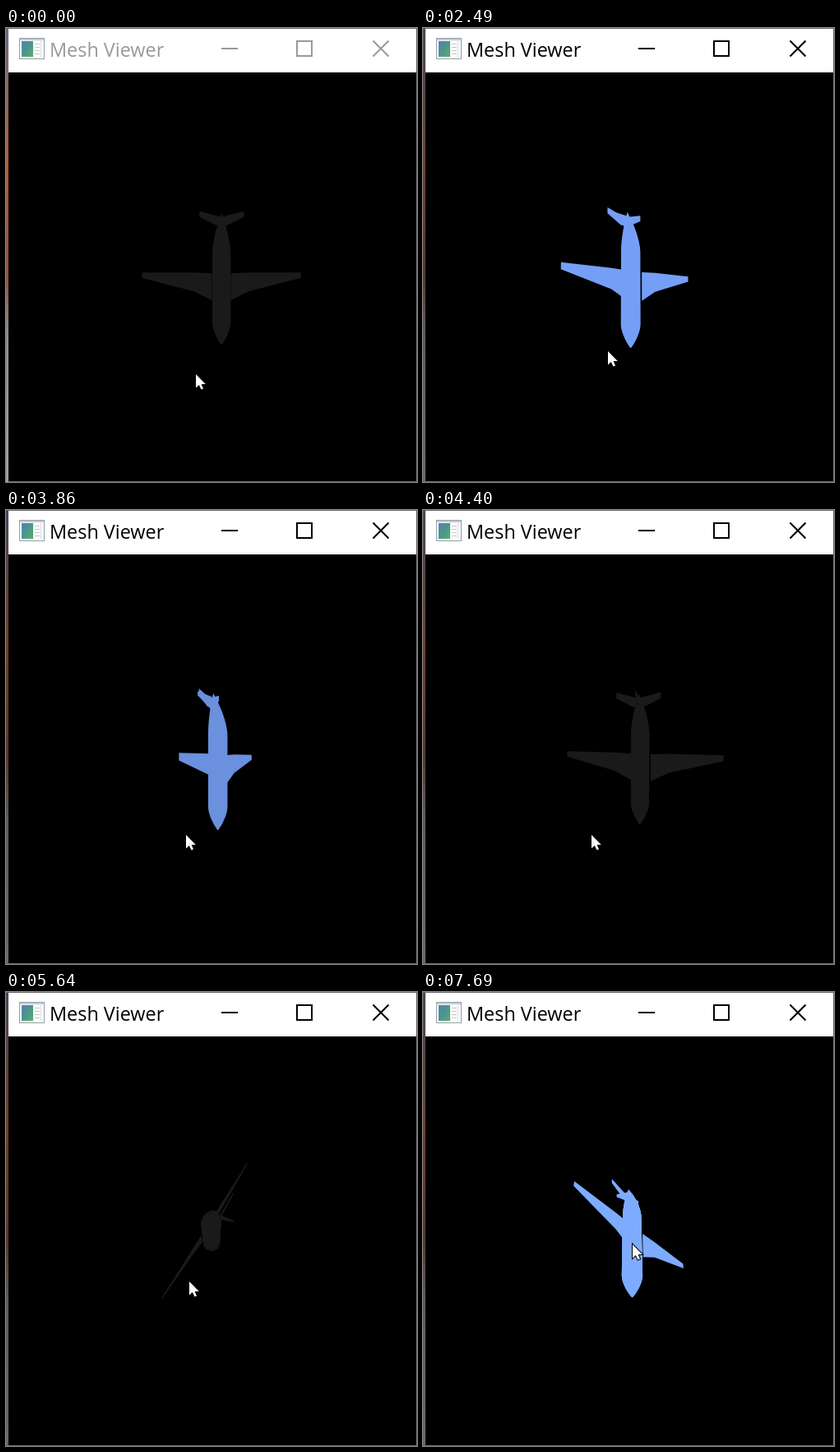
These frames come from a looping animation (500x552 px, 8000 ms). An HTML page with a canvas:

```html
<!DOCTYPE html>
<html lang="en">
<head>
<meta charset="utf-8">
<title>Mesh Viewer</title>
<style>
  html, body { margin: 0; width: 100%; height: 100%; overflow: hidden; background: #000; }
  svg, canvas { position: absolute; left: 0; top: 0; width: 500px; height: 552px; display: block; }
  .title { font: 23.4px "Open Sans", "Noto Sans", sans-serif; fill: #999; }
  .buttons { fill: none; stroke: #999; stroke-width: 2; }
  .shade { fill: #000; opacity: 0; }
  .active .title { fill: #000; }
  .active .buttons { stroke: #000; }
  .active .shade { opacity: .35; }
</style>
</head>
<body>
<svg id="win" viewBox="0 0 500 552">
  <defs>
    <linearGradient id="desk" x1="0" y1="0" x2="0" y2="1">
      <stop offset="0" stop-color="#6c6c84"/>
      <stop offset=".3" stop-color="#a8603c"/>
      <stop offset=".55" stop-color="#8a5440"/>
      <stop offset=".68" stop-color="#8c8c8c"/>
      <stop offset="1" stop-color="#a0a0a0"/>
    </linearGradient>
    <linearGradient id="pic" x1="0" y1="0" x2="1" y2="1">
      <stop offset="0" stop-color="#5580ae"/>
      <stop offset=".5" stop-color="#4a978c"/>
      <stop offset="1" stop-color="#5cae68"/>
    </linearGradient>
  </defs>
  <rect width="3" height="552" fill="url(#desk)"/>
  <rect class="shade" width="3" height="552"/>
  <rect x="3" y="1" width="496" height="53" fill="#fff"/>
  <path d="M0 .5H500M499.5 0V552M2 551.5H500" stroke="#6a6a6a"/>
  <g>
    <rect x="16.5" y="12.5" width="30" height="25" fill="#f4f6f8" stroke="#98a0a8"/>
    <rect x="17" y="13" width="29" height="2" fill="#c4ccd6"/>
    <rect x="19" y="16" width="14" height="19" fill="url(#pic)"/>
    <rect x="34" y="16" width="11" height="19" fill="#fdfdfd"/>
    <path d="M35 19.5H41M35 23.5H41M35 27.5H41M35 31.5H41" stroke="#c6c8cc"/>
    <path d="M42.5 16V35" stroke="#dcdee0"/>
  </g>
  <text class="title" x="53" y="35">Mesh Viewer</text>
  <path class="buttons" d="M262 25H282M354 16H372V34H354ZM446.5 15.5L465.5 34.5M465.5 15.5L446.5 34.5"/>
</svg>
<canvas id="view" width="500" height="552"></canvas>
<script>
const LOOP = 8000, CX = 253, CY = 302.5, DEPTH = 450;
const win = document.getElementById('win');
const ctx = document.getElementById('view').getContext('2d');

// Each drag runs in even steps: first step, last step, steps, then yaw, pitch, cursor x and y at its end
const rest = [0, 0, 231, 421];
const drags = [
  [150, 640, 4, 0, 0, 226, 416],
  [920, 1280, 4, 0, 0, 202, 396],
  [1560, 2490, 8, 137, 6, 225, 393],
  [2770, 3010, 3, 194, 4, 231, 393],
  [3320, 3860, 5, 115.5, 0, 219, 395],
  [4005, 4280, 3, 57, -4, 211, 395],
  [4400, 4400, 1, 14, -7, 205, 395],
  [4680, 4680, 1, -42, -16, 206, 391],
  [4815, 5640, 7, -59, -75, 223, 352],
  [5790, 6570, 7, -165, 0, 237, 325],
  [6690, 6840, 2, -228, 16, 242, 320],
  [7120, 7405, 3, -230, 46, 250, 311],
  [7545, 7690, 2, -230, 37, 255, 307]
];

const wing = [[12, -4.5], [35, -5.5], [100, -5.5], [100, 1.5], [35, 18], [12, 29.5]];
const stab = [[0, -72.5], [27, -79.5], [27, -72.5], [6, -62], [0, -62]];
const fin = [[-82, 27], [-77, 27], [-58, 8], [-74, 8]];

const light = [-.64, .6, -.705];
const tint = [91, 134, 222];
const rad = deg => deg * Math.PI / 180;
const mix = (p, q, k) => p.map((v, i) => v + (q[i] - v) * k);

function poseAt(t) {
  let pose = rest;
  for (const [from, to, steps, ...end] of drags) {
    if (t < from) break;
    const gap = (to - from) / (steps - 1) || 1;
    const done = Math.min(steps, Math.floor((t - from) / gap + .01) + 1);
    pose = mix(pose, end, done / steps);
  }
  return pose;
}

function turn([x, y, z], yaw, pitch) {
  const c = Math.cos(yaw), s = Math.sin(yaw), cp = Math.cos(pitch), sp = Math.sin(pitch);
  const depth = x * s + z * c;
  return [x * c - z * s, y * cp - depth * sp, depth * cp + y * sp];
}

function fillPoly(points) {
  ctx.beginPath();
  points.forEach(p => ctx.lineTo(p[0], p[1]));
  ctx.closePath();
  ctx.fill();
}

function drawPlane(yaw, pitch) {
  const project = (x, y, z) => {
    const [px, py, pz] = turn([x + 9.3, y, z - 9.5], yaw, pitch);
    const k = DEPTH / (DEPTH - pz);
    return [CX + px * k, CY + py * k, k];
  };
  const n = turn([0, 0, 1], yaw, pitch);
  const lit = Math.max(0, n.reduce((sum, v, i) => sum + v * light[i], 0));
  ctx.fillStyle = `rgb(${tint.map(v => Math.min(255, Math.round(26 + v * lit))).join()})`;

  for (const side of [-1, 1]) {
    fillPoly(wing.map(([x, y]) => project(side * x, y, -6.5)));
    fillPoly(stab.map(([x, y]) => project(side * x, y, 11)));
  }
  fillPoly(fin.map(([y, z]) => project(0, y, z)));

  // Tube that narrows to both ends, its tail bent upwards
  const left = [], right = [], squash = Math.abs(Math.sin(pitch));
  for (let y = -78; y <= 84; y++) {
    const tail = Math.max(0, (-28 - y) / 50);
    const nose = Math.max(0, (y - 57) / 28);
    const [sx, sy, k] = project(0, y, 6 * tail ** 1.5);
    const r = 11.4 * (1 - Math.max(tail, nose) ** 1.7) * k;
    left.push([sx - r, sy]);
    right.unshift([sx + r, sy]);
    ctx.beginPath();
    ctx.ellipse(sx, sy, r, r * squash, 0, 0, 7);
    ctx.fill();
  }
  fillPoly(left.concat(right));
}

const arrow = new Path2D('M0 0V16.5L3.8 13L6.5 18.5L9 17.4L6.6 12H11.8Z');
function drawCursor(x, y) {
  ctx.save();
  ctx.translate(Math.round(x), Math.round(y));
  ctx.strokeStyle = '#000';
  ctx.lineWidth = 2;
  ctx.stroke(arrow);
  ctx.fillStyle = '#fff';
  ctx.fill(arrow);
  ctx.restore();
}

function draw(t) {
  const [yaw, pitch, x, y] = poseAt(t);
  win.classList.toggle('active', t >= 1560);
  ctx.clearRect(0, 0, 500, 552);
  ctx.fillStyle = '#000';
  ctx.fillRect(3, 54, 496, 497);
  drawPlane(rad(yaw), rad(pitch));
  drawCursor(x, y);
}

const start = performance.now();
function loop() {
  draw((performance.now() - start) % LOOP);
  requestAnimationFrame(loop);
}
loop();
</script>
</body>
</html>
```
